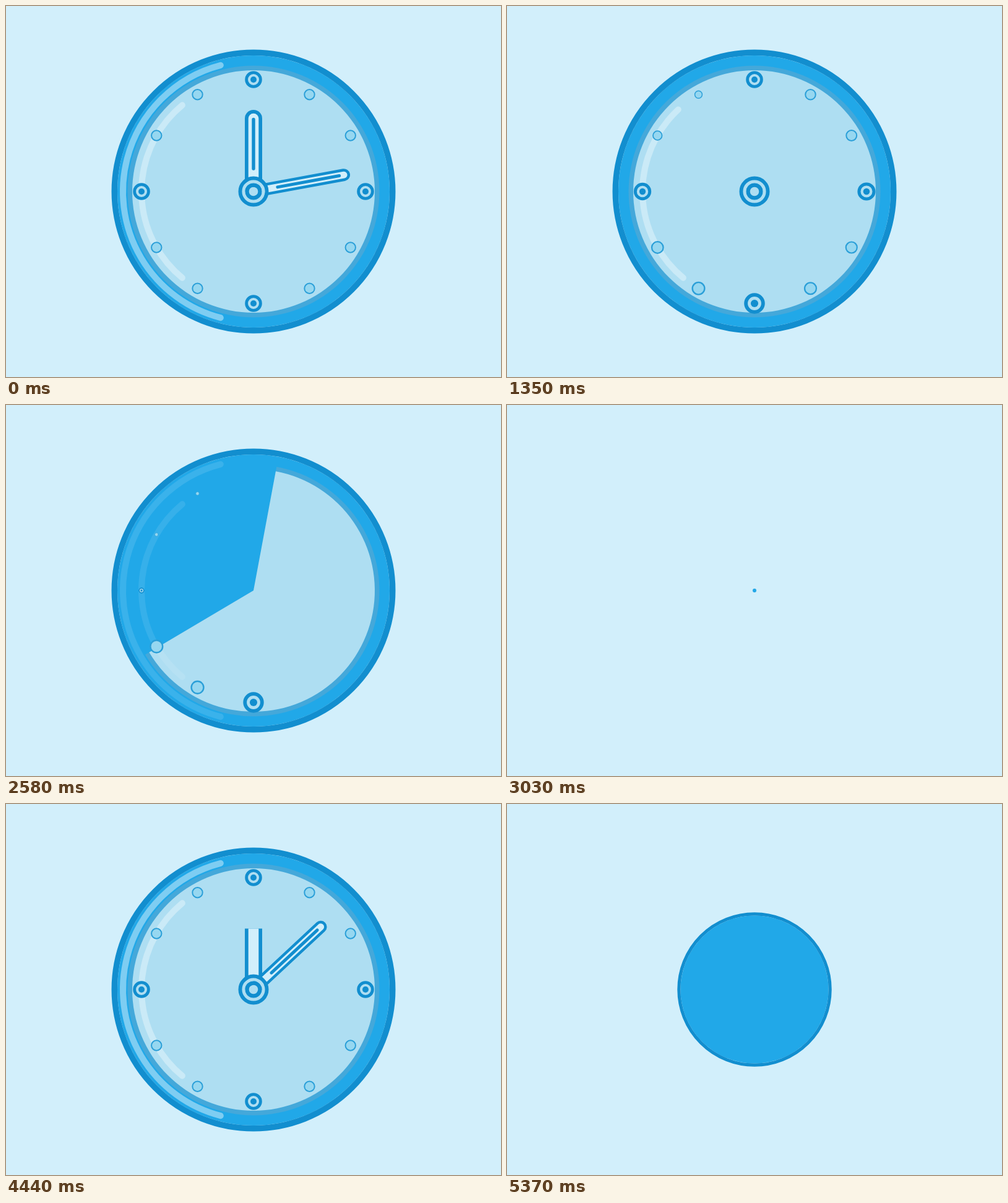
Write an HTML page with a canvas that moves like this. It is 800 by 600 pixels and loops after 5400 ms.

```html
<!DOCTYPE html>
<html lang="en">
<head>
<meta charset="utf-8">
<title>Clock</title>
<style>
  html, body { margin: 0; width: 100%; height: 100%; overflow: hidden; background: #d2effb; }
  canvas { display: block; width: 800px; height: 600px; }
</style>
</head>
<body>
<canvas id="stage" width="800" height="600"></canvas>
<script>
const ctx = document.getElementById('stage').getContext('2d');

const LOOP = 5400, HOLD = 300, CYCLE = 2550, START = 810, REST = 1370;
const BG = '#d2effb', DARK = '#128ecf', BLUE = '#21a8e8', SHADE = '#44a8da',
      FACE = '#aedef2', DOT = '#96d7f0', DOT_EDGE = '#2b9fd8';
const TAU = Math.PI * 2, RAD = Math.PI / 180;

const linear = x => x;
const quadOut = x => 1 - (1 - x) ** 2;
const cubicOut = x => 1 - (1 - x) ** 3;
const sine = x => (1 - Math.cos(Math.PI * x)) / 2;
const cubic = x => x < .5 ? 4 * x ** 3 : 1 - 4 * (1 - x) ** 3;

// Eased progress of u between two times, clamped to 0..1
const seg = (u, from, to, ease = linear) =>
  ease(Math.min(1, Math.max(0, (u - from) / (to - from))));

// Value along [time, value, ease] keys
function track(u, keys) {
  let value = keys[0][1];
  for (let i = 1; i < keys.length; i++) {
    const [time, to, ease] = keys[i];
    value += (to - keys[i - 1][1]) * seg(u, keys[i - 1][0], time, ease);
  }
  return value;
}

function disc(r, color) {
  ctx.beginPath();
  ctx.arc(0, 0, r, 0, TAU);
  ctx.fillStyle = color;
  ctx.fill();
}

function ring(inner, outer, color) {
  ctx.beginPath();
  ctx.arc(0, 0, (inner + outer) / 2, 0, TAU);
  ctx.lineWidth = outer - inner;
  ctx.strokeStyle = color;
  ctx.stroke();
}

// Clock angles: degrees clockwise from twelve
function sector(r, from, to, color) {
  ctx.beginPath();
  if (to - from < 359.9) ctx.moveTo(0, 0);
  ctx.arc(0, 0, r, (from - 90) * RAD, (to - 90) * RAD);
  ctx.closePath();
  ctx.fillStyle = color;
  ctx.fill();
}

function group(draw, { x = 0, y = 0, scale = 1, turn = 0, alpha = 1 }) {
  if (scale <= 0.001 || alpha <= 0) return;
  ctx.save();
  ctx.translate(x, y);
  ctx.rotate(turn * RAD);
  ctx.scale(scale, scale);
  ctx.globalAlpha = alpha;
  draw();
  ctx.restore();
}

function body(u) {
  const scale = track(u, [[60, 1.2], [240, .9, cubic], [360, 1.1, sine], [480, 1, sine],
    [1800, 1], [1890, 1.2, sine], [2260, 0, quadOut]]);
  group(() => {
    disc(220, BLUE);
    ring(220, 229.5, DARK);
    const out = seg(u, 1690, 1870, cubic);
    const from = 29 * out;
    const to = out > 0 ? 360 - 331 * out : 360 * seg(u, 310, 500, sine);
    if (to - from > .1) {
      sector(203.5, from, to, SHADE);
      sector(196, from, to, FACE);
    }
  }, { scale, alpha: seg(u, 66, 366) });
}

// Arc on the left side, drawn upwards from its lower end
function shine(r, half, width, alpha, p) {
  if (p <= 0 || alpha <= 0) return;
  const start = 180 - half;
  ctx.beginPath();
  ctx.arc(0, 0, r, start * RAD, (start + 2 * half * p) * RAD);
  ctx.lineWidth = width;
  ctx.lineCap = 'round';
  ctx.strokeStyle = `rgba(255,255,255,${alpha})`;
  ctx.stroke();
}

function shines(u) {
  const fade = 1 - seg(u, 1640, 1820);
  shine(181, 50.5, 10, .34 * fade, seg(u, 390, 575, quadOut));
  shine(211, 75.4, 10, .42 * fade, seg(u, 552, 740, quadOut));
}

function ticks(u) {
  const leave = [1455, 1530, 1670, 1600];
  for (let k = 0; k < 12; k++) {
    const a = 264 + 16 * k, b = leave[Math.floor(k / 3)];
    const scale = track(u, [[a, 0], [a + 180, 1.22, sine], [a + 280, 1, quadOut],
      [b, 1], [b + 100, 1.21, sine], [b + 210, 0, sine]]);
    group(() => {
      if (k % 3) {
        disc(8, DOT);
        ring(7.2, 9.2, DOT_EDGE);
      } else {
        disc(10, FACE);
        ring(9, 13.8, DARK);
        disc(5, DARK);
      }
    }, { x: 181 * Math.sin(k * 30 * RAD), y: -181 * Math.cos(k * 30 * RAD), scale });
  }
}

function stroke(from, to, width, color) {
  ctx.beginPath();
  ctx.moveTo(0, -from);
  ctx.lineTo(0, -to);
  ctx.lineWidth = width;
  ctx.lineCap = 'round';
  ctx.strokeStyle = color;
  ctx.stroke();
}

function hand({ turn, length, width, edge, core, line, grown, lined }) {
  if (grown <= 0) return;
  group(() => {
    const reach = 18 + (length + width / 2 - 17) * grown;
    ctx.beginPath();
    ctx.rect(-30, -reach, 60, reach);
    ctx.clip();
    stroke(0, length, width, DARK);
    stroke(0, length, width - 2 * edge, BG);
    if (lined > 0) stroke(core[0], core[0] + (core[1] - core[0]) * lined, line, DARK);
  }, { turn });
}

const between = (u, a, b, c, d) => seg(u, a, b, sine) - seg(u, c, d, sine);

function hands(u) {
  hand({
    turn: 0, length: 118, width: 28, edge: 5.7, core: [37, 116.5], line: 5.4,
    grown: between(u, 980, 1140, 1510, 1630), lined: between(u, 1110, 1290, 1450, 1560)
  });
  hand({
    turn: 79.6 * seg(u, 845, 1268, sine),
    length: 148.5, width: 20, edge: 4.5, core: [39.5, 141], line: 5,
    grown: between(u, 690, 860, 1510, 1650), lined: between(u, 800, 960, 1450, 1560)
  });
}

function hub(u) {
  const scale = track(u, [[0, 0], [180, 1, cubicOut], [1600, 1], [1660, 1.15, sine], [1750, 0, sine]]);
  group(() => {
    disc(7.3, FACE);
    ring(7.3, 13.7, DARK);
    ring(13.7, 18.6, FACE);
    ring(18.6, 24.5, DARK);
  }, { scale, alpha: seg(u, 0, 330) });
}

function frame(now) {
  const t = now % LOOP;
  const u = t < HOLD ? REST : (t - START + CYCLE) % CYCLE;
  ctx.setTransform(1, 0, 0, 1, 0, 0);
  ctx.fillStyle = BG;
  ctx.fillRect(0, 0, 800, 600);
  ctx.translate(400, 300);
  for (const part of [body, shines, ticks, hands, hub]) part(u);
}

const begin = performance.now();
function loop() {
  frame(performance.now() - begin);
  requestAnimationFrame(loop);
}
loop();
</script>
</body>
</html>
```
